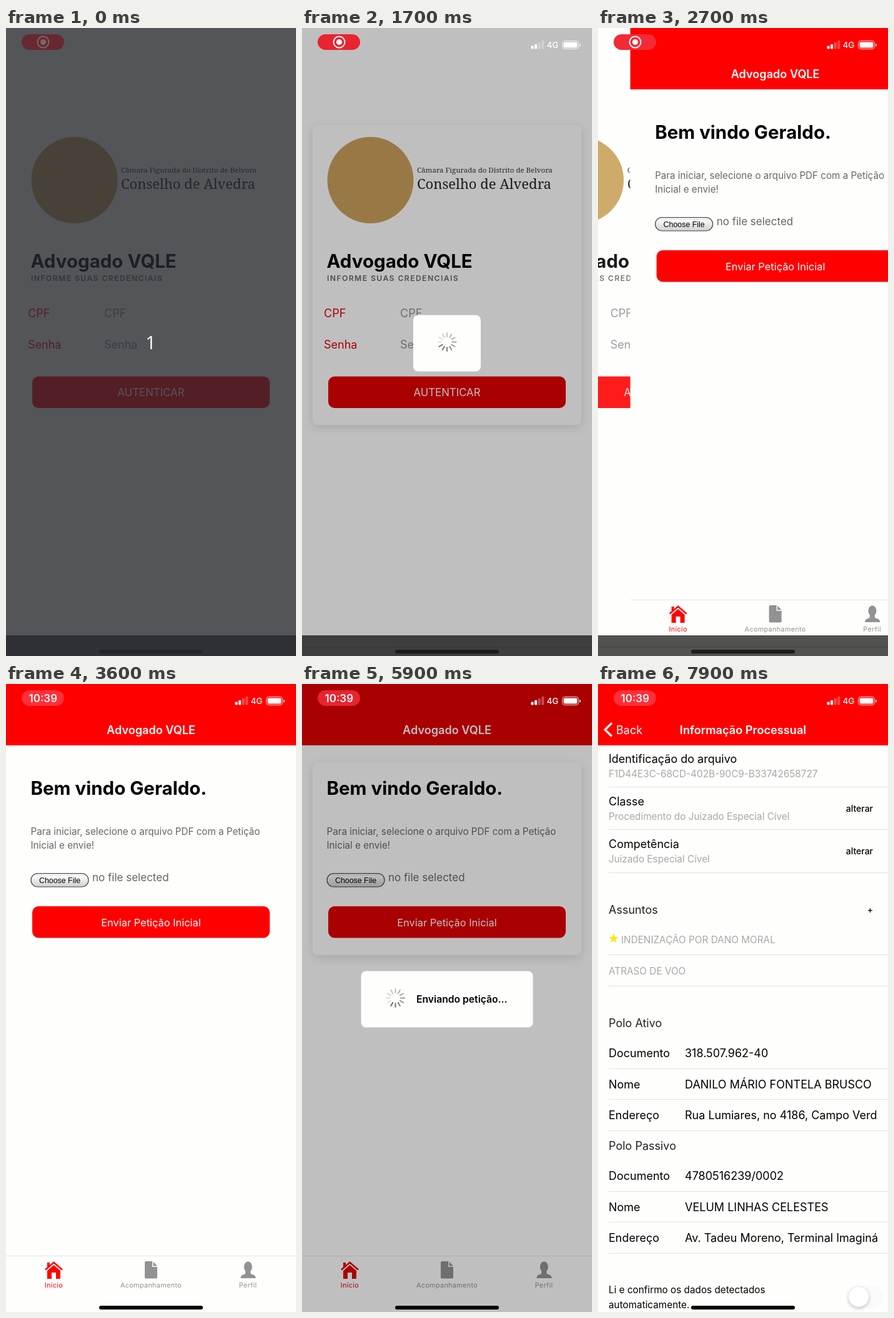
Animation, 464 px wide and 1003 px high, one loop 8000 ms. Source, as an HTML page with a canvas:

```html
<!DOCTYPE html>
<html lang="pt-BR">
<head>
<meta charset="utf-8">
<style>
html, body { margin: 0; width: 100%; height: 100%; overflow: hidden; background: #fefefd; }
canvas { display: block; width: 464px; height: 1003px; }
</style>
</head>
<body>
<canvas id="stage" width="464" height="1003"></canvas>
<script>
const W = 464, H = 1003, LOOP = 8000;
const c = document.getElementById('stage').getContext('2d');
const APP = 'Advogado VQLE', PAPER = '#fefefd';
const SANS = 'Inter, sans-serif', SERIF = '"Noto Serif", serif';

const clamp = v => Math.max(0, Math.min(1, v));

// CSS-like cubic-bezier easing, solved by bisection
function bezier(x1, y1, x2, y2) {
  const at = (a, b, u) => 3 * u * (1 - u) ** 2 * a + 3 * u * u * (1 - u) * b + u ** 3;
  return time => {
    const x = clamp(time);
    let lo = 0, hi = 1;
    if (x === 0 || x === 1) return x;
    for (let i = 0; i < 24; i++) {
      const mid = (lo + hi) / 2;
      if (at(x1, x2, mid) < x) lo = mid; else hi = mid;
    }
    return at(y1, y2, lo);
  };
}
const easeInOut = bezier(.42, 0, .58, 1);
const easePush = bezier(.36, .66, .04, 1);

// ---- drawing helpers ----
function text(s, x, y, size, color = '#000', { weight = 400, align = 'left', gap = 0, family = SANS } = {}) {
  c.font = `${weight} ${size}px ${family}`;
  c.letterSpacing = gap + 'px';
  c.textAlign = align;
  c.fillStyle = color;
  c.fillText(s, x, y);
}
function rect(x, y, w, h, color) {
  c.fillStyle = color;
  c.fillRect(x, y, w, h);
}
function box(x, y, w, h, r, color) {
  c.fillStyle = color;
  c.beginPath();
  c.roundRect(x, y, w, h, r);
  c.fill();
}
function disc(x, y, r, color) {
  c.fillStyle = color;
  c.beginPath();
  c.arc(x, y, r, 0, 7);
  c.fill();
}
function poly(points, color) {
  c.fillStyle = color;
  c.beginPath();
  points.forEach(p => c.lineTo(...p));
  c.fill();
}
function line(points, color, width) {
  c.strokeStyle = color;
  c.lineWidth = width;
  c.beginPath();
  points.forEach(p => c.lineTo(...p));
  c.stroke();
}
function clip(x, y, w, h) {
  c.beginPath();
  c.rect(x, y, w, h);
  c.clip();
}
function layer(dx, alpha, draw) {
  c.save();
  c.translate(dx, 0);
  c.globalAlpha *= alpha;
  draw();
  c.restore();
}
function spinner(x, y, head, color) {
  for (let i = 0; i < 12; i++) {
    const lag = (((head - i * 30) % 360 + 360) % 360) / 360;
    c.save();
    c.translate(x, y);
    c.rotate(i * Math.PI / 6);
    c.globalAlpha *= 1 - .9 * lag;
    box(-1, -15.5, 2, 8, 1, color);
    c.restore();
  }
}
const red = dim => `rgb(${255 - 31 * dim}, 0, 0)`;

// ---- loading dialogs ----
const dialogs = [
  { open: 900, close: 2080, zero: 1033, w: 108, label: '' },
  { open: 4278, close: 6377, zero: 4317, w: 275, label: 'Enviando petição...' }
];
function dialogState(t) {
  const d = dialogs.find(d => t > d.open && t < d.close + 200);
  if (!d) return { shade: 0, dim: 0 };
  const p = easeInOut((t - d.open) / 200), q = easeInOut((t - d.close) / 200);
  return {
    ...d,
    alpha: p * (1 - q),
    scale: 1 + .1 * (1 - p) - .1 * q,
    shade: .25 * p ** 2.5 * (1 - q),
    dim: p ** .55 * (1 - q)
  };
}
function drawDialog(d, t) {
  if (!d.w) return;
  c.save();
  c.globalAlpha = d.alpha;
  c.translate(232, 503.5);
  c.scale(d.scale, d.scale);
  box(-d.w / 2, -45, d.w, 90, 8, PAPER);
  spinner(d.label ? -82.5 : 0, -2, (t - d.zero) * .36, '#6c6c6c');
  text(d.label, -49, 5.5, 15.7, '#000', { weight: 600 });
  c.restore();
}

// ---- screens ----
function card(y, h, dim) {
  c.save();
  c.shadowColor = `rgba(0, 0, 0, ${.13 * dim})`;
  c.shadowBlur = 16;
  c.shadowOffsetY = 4;
  box(17, y, 430, h, 8, PAPER);
  c.restore();
}
function button(label, y, size, dim, pressed) {
  box(42, y, 380, 50.5, 10, red(dim));
  if (pressed) box(42, y, 380, 50.5, 10, 'rgba(0, 0, 0, .12)');
  text(label, 232, y + 31.5, size, '#fff', { align: 'center' });
}
function login(dim, pressed) {
  rect(0, 0, W, H, PAPER);
  card(155, 479, dim);
  disc(109.5, 243, 69, '#c9a15a');
  text('Câmara Figurada do Distrito de Belvora', 184, 231, 11.5, '#333', { family: SERIF });
  text('Conselho de Alvedra', 184, 257, 22, '#222', { family: SERIF });
  text(APP, 39.5, 383, 29.5, '#000', { weight: 700 });
  text('INFORME SUAS CREDENCIAIS', 40, 404, 12.2, '#666', { weight: 600, gap: 1.4 });
  [['CPF', 462], ['Senha', 511.5]].forEach(([s, y]) => {
    text(s, 35, y, 18, red(dim));
    text(s, 157, y, 18, '#909090');
  });
  button('AUTENTICAR', 556.5, 16.8, dim, pressed);
}
function tabs(dim) {
  const on = red(dim), off = '#929292';
  rect(0, 913, W, 90, PAPER);
  rect(0, 913, W, 1, '#e4e4e4');
  line([[63, 935.5], [76.5, 924], [90, 935.5]], on, 2.6);
  rect(66, 924, 4, 7, on);
  poly([[66, 937], [76.5, 928], [87, 937], [87, 950], [80, 950], [80, 940], [73, 940], [73, 950], [66, 950]], on);
  box(222, 922, 20, 27.5, 2, off);
  poly([[234, 921], [243, 921], [243, 931], [234, 931]], PAPER);
  poly([[235.5, 922.5], [242, 929.5], [235.5, 929.5]], off);
  rect(234, 931, 8, .5, off);
  c.beginPath();
  c.ellipse(387.3, 931, 6.5, 8.5, 0, 0, 7);
  c.fill();
  poly([[383.5, 936], [391, 936], [391.5, 942], [398, 944.5], [400, 949], [375, 949], [377, 944.5], [383, 942]], off);
  [['Início', 76.5, on], ['Acompanhamento', 232, off], ['Perfil', 387, off]].forEach(([s, x, color]) =>
    text(s, x, 964, 10.8, color, { align: 'center', gap: .35 }));
}
function chooser() {
  const g = c.createLinearGradient(0, 302, 0, 324);
  g.addColorStop(0, '#ddd');
  g.addColorStop(.25, '#fafafa');
  g.addColorStop(1, '#cfcfcf');
  box(40, 302.5, 92, 21.5, 10.7, g);
  c.strokeStyle = '#444';
  c.lineWidth = 1.2;
  c.stroke();
  text('Choose File', 86, 318, 12.4, '#000', { align: 'center', family: '"Liberation Sans", sans-serif' });
  text('no file selected', 138, 314.5, 17, '#666');
}
function home(dim, pressed, push) {
  rect(0, 0, W, H, PAPER);
  card(124.5, 308.5, dim);
  text('Bem vindo Geraldo.', 39.5, 177, 29.5, '#000', { weight: 700 });
  text('Para iniciar, selecione o arquivo PDF com a Petição', 39.5, 241, 15.2, '#666');
  text('Inicial e envie!', 39.5, 262.5, 15.2, '#666');
  chooser();
  button('Enviar Petição Inicial', 355, 16.4, dim, pressed);
  tabs(dim);

  rect(0, 0, W, 98, red(dim));
  const title = { weight: 600, align: 'center' };
  layer(0, 1 - push, () => text(APP, 232, 80, 18.1, '#fff', title));
  const rest = W * (1 - push);
  layer(0, push, () => {
    line([[22, 62.5], [11.2, 73], [22, 83.5]], '#fff', 3.2);
    text('Back', 29 + rest * .24, 79.5, 18, '#fff');
    text('Informação Processual', 232 + rest, 80, 18.2, '#fff', title);
  });
}
function heading(s, y) { text(s, 17, y, 18, '#222'); }
function rule(y) { rect(17, Math.floor(y), W - 17, 1, '#e2e2e2'); }
function party(y, values) {
  ['Documento', 'Nome', 'Endereço'].forEach((label, i) => {
    const base = y + i * 49.5;
    text(label, 17, base, 18);
    c.save();
    clip(139, base - 25, 308, 40);
    text(values[i], 139, base, 18);
    c.restore();
    rule(base + 18);
  });
}
function star(x, y, r) {
  poly(Array.from({ length: 10 }, (_, i) => {
    const a = i * Math.PI / 5, k = i % 2 ? r * .4 : r;
    return [x + k * Math.sin(a), y - k * Math.cos(a)];
  }), '#ffe500');
}
function details() {
  const grey = '#a8a8a8', act = { weight: 500, align: 'right' };
  [
    ['Identificação do arquivo', 'F1D44E3C-68CD-402B-90C9-B33742658727'],
    ['Classe', 'Procedimento do Juizado Especial Cível'],
    ['Competência', 'Juizado Especial Cível']
  ].forEach(([a, b], i) => {
    const y = 126 + i * 68.2;
    text(a, 17, y, 18);
    text(b, 17, y + 23, 15.3, grey);
    if (i) text('alterar', 440, y + 9.5, 14, '#000', act);
    rule(y + 38.6);
  });
  heading('Assuntos', 366.5);
  text('+', 440, 366, 14, '#000', act);
  star(25, 406.5, 8);
  text('INDENIZAÇÃO POR DANO MORAL', 37, 414, 15.3, grey);
  rule(432);
  text('ATRASO DE VOO', 17, 463.5, 15.3, grey);
  rule(482);
  heading('Polo Ativo', 547.5);
  party(596, ['318.507.962-40', 'DANILO MÁRIO FONTELA BRUSCO', 'Rua Lumiares, no 4186, Campo Verdes']);
  heading('Polo Passivo', 743.5);
  party(792, ['4780516239/0002', 'VELUM LINHAS CELESTES', 'Av. Tadeu Moreno, Terminal Imaginário']);
  text('Li e confirmo os dados detectados', 17, 972.5, 15.3);
  text('automaticamente.', 17, 996.5, 15.3);
  box(399, 961.5, 57, 35, 17.5, '#fafafa');
  c.save();
  c.shadowColor = 'rgba(0, 0, 0, .25)';
  c.shadowBlur = 6;
  c.shadowOffsetY = 2;
  disc(417, 979, 16, '#fff');
  c.restore();
}
function filing(t) {
  const loading = t < 7200;
  c.save();
  clip(-20, 98, W + 20, H);
  c.shadowColor = 'rgba(0, 0, 0, .35)';
  c.shadowBlur = 12;
  rect(0, 80, W, H, loading ? '#faf9f8' : PAPER);
  c.restore();
  if (loading) spinner(232, 131.5, (t - 6417) * .36, '#000');
  else details();
}

// ---- system overlays ----
function pill(t) {
  const glow = .5 - .5 * Math.cos((t - 1700) / 4200 * 2 * Math.PI);
  box(25, 10, 68, 25, 12.5, `rgb(${232 + 23 * glow}, ${36 + 12 * glow}, ${48 + 8 * glow})`);
  if (t < 3400) {
    disc(59.5, 22.5, 4.5, '#fff');
    c.strokeStyle = '#fff';
    c.lineWidth = 2;
    c.beginPath();
    c.arc(59.5, 22.5, 9, 0, 7);
    c.stroke();
  } else {
    text('10:39', 59.3, 29, 17, '#fff', { weight: 600, align: 'center' });
  }
}
function status() {
  [5, 7.5, 10.5, 13.5].forEach((h, i) =>
    box(366.5 + i * 5.6, 33.5 - h, 4, h, 1, i < 2 ? '#fff' : 'rgba(255, 255, 255, .3)'));
  text('4G', 391.5, 32, 13.5, '#fff', { weight: 500 });
  c.strokeStyle = 'rgba(255, 255, 255, .8)';
  c.lineWidth = 1;
  c.beginPath();
  c.roundRect(416.5, 20.5, 26, 13, 4);
  c.stroke();
  box(418.5, 22.5, 22, 9, 2, '#fff');
  box(444, 25, 1.8, 4.5, 1, 'rgba(255, 255, 255, .8)');
}

function draw(t) {
  const d = dialogState(t), banded = t < 2900;
  const enter = easePush((t - 2503) / 500), push = easePush((t - 6375) / 500);

  rect(0, 0, W, H, PAPER);
  if (enter < 1) layer(-W * .333 * enter, 1 - .12 * enter, () => login(d.dim, t >= 800 && t < 1050));
  if (enter > 0) layer(W * (1 - enter), 1, () => home(d.dim, t >= 4200 && t < 4500, push));
  if (banded) {
    rect(0, 970, W, 33, '#525251');
    rect(0, 988, W, 1.5, '#494949');
  }
  rect(0, 0, W, H, `rgba(4, 0, 8, ${d.shade})`);
  if (push > 0) layer(W * (1 - push), 1, () => filing(t));
  drawDialog(d, t);
  box(149, 993, 166, 6, 3, banded ? '#1c1c1c' : '#000');

  if (t < 100) {
    pill(t);
    rect(0, 0, W, H, 'rgba(38, 40, 46, .79)');
    layer(0, .12, () => pill(t));
    text('1', 231.7, 512.5, 30, '#fff', { align: 'center', family: '"Open Sans", sans-serif' });
  } else {
    pill(t);
    status();
  }
}

const start = performance.now();
function tick() {
  draw((performance.now() - start) % LOOP);
  requestAnimationFrame(tick);
}
tick();
</script>
</body>
</html>
```
